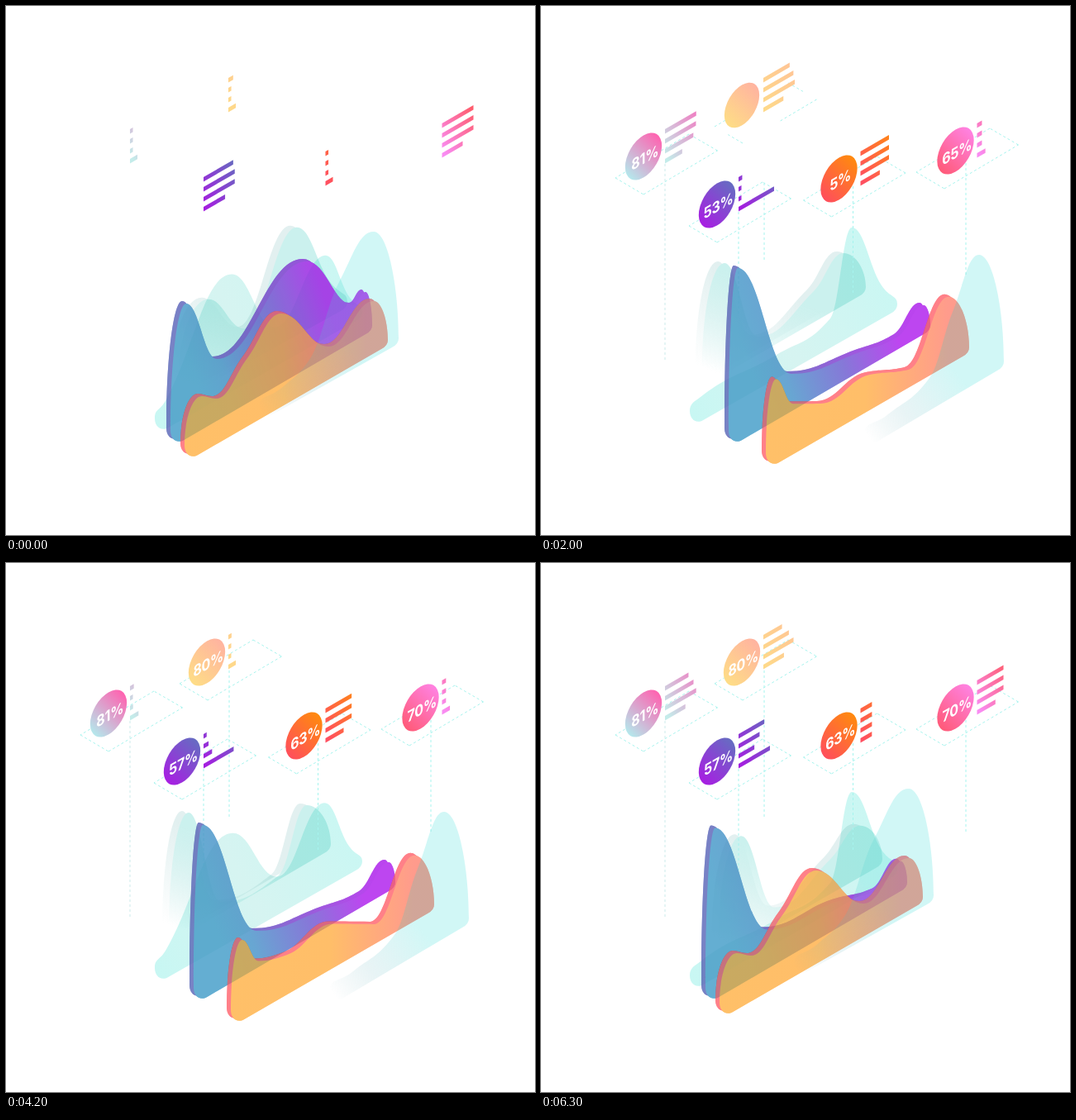
An HTML page for the animation above (6.4 s loop, 640 px wide and 640 px high).

```html
<!DOCTYPE html>
<html lang="en">
<head>
<meta charset="utf-8">
<title>Isometric charts</title>
<style>
  html, body { margin: 0; width: 100%; height: 100%; overflow: hidden; background: #fff; }
  svg { display: block; width: 100vw; height: 100vh; }
  text { font: 700 18.5px Inter, "Open Sans", sans-serif; letter-spacing: -.3px; fill: #fff; text-anchor: middle; }
  .dash { fill: none; stroke: #a6f4ee; stroke-dasharray: 3 3; }
</style>
</head>
<body>
<svg id="stage" viewBox="0 0 640 640"></svg>
<script>
const LOOP = 6400, STEP = 100;
const stage = document.getElementById('stage');

function set(node, attrs) {
  for (const k in attrs) node.setAttribute(k, attrs[k]);
}
function add(parent, tag, attrs = {}) {
  const node = document.createElementNS('http://www.w3.org/2000/svg', tag);
  set(node, attrs);
  return parent.appendChild(node);
}
const defs = add(stage, 'defs');
// A stop is [offset, colour, opacity]
function gradient([x1, y1, x2, y2], stops, gradientUnits = 'userSpaceOnUse') {
  const id = 'g' + defs.childElementCount;
  const g = add(defs, 'linearGradient', { id, x1, y1, x2, y2, gradientUnits });
  for (const [offset, color, opacity = 1] of stops)
    add(g, 'stop', { offset, 'stop-color': color, 'stop-opacity': opacity });
  return `url(#${id})`;
}

const clamp = x => Math.min(1, Math.max(0, x));
const wave = x => (1 - Math.cos(Math.PI * clamp(x))) / 2;
const mix = (a, b, k) => a + (b - a) * k;
const progress = (t, start, length) => clamp((t - start) / length);
// Sum of soft bumps, each [centre, half width, height]
const pulse = (t, bumps) => bumps.reduce(
  (sum, [at, half, height = 1]) => sum + height * wave(1 - Math.abs(t - at) / half), 0);

// Each chart blends from pose a to pose b; a pose runs wall, peaks and valleys, wall
const charts = {
  back: {
    shift: [20, 18], bumps: [[0, 900], [900, 1000, -.35], [3000, 1000], [4200, 1000, -.35], [6900, 700]],
    a: [[195, 440], [222, 311], [262, 400], [330, 345], [366, 299], [393, 340]],
    b: [[188, 440], [225, 337], [268, 372], [332, 249], [372, 316], [393, 340]],
    fill: gradient([205, 440, 250, 330], [[0, '#cbf1ee', 0], [1, '#cbf1ee']]),
    rim: gradient([205, 440, 250, 330], [[0, '#e2f0f0', 0], [1, '#e2f0f0']]),
    rimShift: [-8, -2]
  },
  mint: {
    shift: [0, 9], bumps: [[350, 1600], [4500, 1000]],
    a: [[180, 490], [193, 473], [285, 422], [350, 378], [376, 268], [412, 338], [431, 361]],
    b: [[180, 490], [193, 468], [272, 302], [322, 380], [388, 296], [416, 344], [431, 361]],
    fill: gradient([180, 490, 430, 350], [[0, '#c8f7f3'], [.5, '#d6f4f1'], [1, '#caf7f3']])
  },
  blue: {
    shift: [-28, 0], bumps: [[0, 1400], [3300, 860], [7000, 860]],
    a: [[227, 514], [238, 317], [303, 445], [385, 419], [432, 400], [463, 362], [471, 386]],
    b: [[227, 514], [246, 360], [283, 427], [392, 309], [448, 362], [463, 346], [471, 386]],
    fill: gradient([250, 430, 420, 370], [[0, '#64aed2'], [.2, '#68a6d2'], [.6, '#8678d8'], [1, '#bd46f0']]),
    rim: gradient([222, 0, 450, 0], [[0, '#7784c4'], [.4, '#8070cc'], [1, '#ba44ee']]),
    solid: .65
  },
  amber: {
    shift: [-56, -9], bumps: [[3000, 2800]],
    a: [[272, 541], [293, 481], [310, 484], [348, 435], [389, 381], [446, 421], [501, 366], [518, 413]],
    b: [[272, 541], [281, 440], [303, 480], [335, 499], [400, 472], [445, 447], [490, 346], [518, 413]],
    fill: gradient([267, 0, 518, 0], [[0, '#ffc068'], [.5, '#ffbe69'], [.9, '#ff9b8c']]),
    rim: '#ff8088', solid: .65
  },
  aqua: {
    shift: [-85, -28], bumps: [[350, 1500], [5900, 1800]],
    a: [[392, 515], [420, 494], [470, 450], [498, 370], [530, 301], [560, 430]],
    b: [[392, 510], [420, 488], [450, 456], [486, 362], [530, 301], [560, 430]],
    fill: gradient([395, 520, 500, 440], [[0, '#e0ecee', 0], [.4, '#e0f0f2', .7], [1, '#d1f7f6']]),
    solid: .16
  }
};

function addChart(chart) {
  chart.layers = [];
  const layer = style => {
    const g = add(stage, 'g', { style });
    const [x, y] = chart.rimShift || [-5, -3];
    const rim = chart.rim && add(g, 'path', { fill: chart.rim, transform: `translate(${x} ${y})` });
    const face = add(g, 'path', { fill: chart.fill });
    chart.layers.push({ g, paths: rim ? [rim, face] : [face] });
  };
  layer('mix-blend-mode:multiply');
  if (chart.solid) layer(`opacity:${chart.solid}`);
}

// Level at every peak and valley, upright at both walls, sloping base with round corners
function outline(points) {
  const last = points.length - 1;
  const steep = i => (points[i + 1][1] - points[i][1]) / (points[i + 1][0] - points[i][0]);
  const tangent = i => {
    const l = steep(i - 1), r = steep(i);
    return l * r <= 0 ? 0 : 2 * l * r / (l + r);
  };
  let d = `M${points[0]}`;
  for (let i = 0; i < last; i++) {
    const [x0, y0] = points[i], [x1, y1] = points[i + 1];
    const atWall = i === 0 || i + 1 === last;
    const reach = (atWall ? .55 : .42) * (x1 - x0);
    const from = i === 0 ? [x0, mix(y0, y1, .55)] : [x0 + reach, y0 + reach * tangent(i)];
    const to = i + 1 === last ? [x1, mix(y0, y1, .5)] : [x1 - reach, y1 - reach * tangent(i + 1)];
    d += `C${from} ${to} ${x1},${y1}`;
  }
  const [xl, yl] = points[0], [xr, yr] = points[last];
  return d + `Q${xr},${yr + 7} ${xr - 8},${yr + 11}L${xl + 18},${yl + 10}C${xl + 8},${yl + 17} ${xl},${yl + 10} ${xl},${yl}Z`;
}

function drawChart({ a, b, bumps, shift, layers }, t, apart) {
  const k = pulse(t, bumps);
  const d = outline(a.map((p, i) => p.map((n, j) => mix(n, b[i][j], k))));
  for (const { g, paths } of layers) {
    set(g, { transform: `translate(${shift.map(n => n * apart)})` });
    paths.forEach(p => set(p, { d }));
  }
}

// disc and count are [start, length]; lag delays each bar after the one above
const badges = [
  { at: [124, 182], colors: ['#b4e8ec', '#ff62b0'], barColors: ['#c4ecea', '#ee82c4'],
    disc: [0, 1160], pop: 0, count: [70, 1160], value: 81, post: [150, 430], postColor: '#cdeaea',
    bumps: [[1900, 1900], [5700, 1700]], lag: 250 },
  { at: [213, 240], colors: ['#a81ee2', '#666cc2'], barColors: ['#a41fdf', '#6868c0'],
    disc: [450, 1160], pop: 1000, count: [920, 1160], value: 57, post: [239, 375],
    bumps: [[300, 1900], [5800, 1700]], lag: -200, tail: 43 },
  { at: [243, 120], colors: ['#fedd86', '#ffb3a0'], barColors: ['#fed98a', '#ffc396'],
    disc: [820, 1500], pop: 2050, count: [2100, 1060], value: 80, post: [270, 307], late: true,
    bumps: [[1500, 1800], [5600, 1500]], lag: 250 },
  { at: [360.5, 209], colors: ['#ff4e5c', '#ff8a0e'], barColors: ['#ff5060', '#ff8418'],
    disc: [380, 1160], pop: 1700, count: [1912, 1088], value: 63, post: [377.5, 350],
    bumps: [[1650, 1700], [4850, 2300]] },
  { at: [501.5, 175], colors: ['#ff5a78', '#ff82e2'], barColors: ['#f98cf2', '#ff5c6c'],
    disc: [0, 1160], pop: 770, count: [770, 1320], value: 70, post: [514, 325],
    bumps: [[0, 2400], [3150, 1200], [6600, 1100]] }
];
// Panel corners around the post
const PANEL = [[-26, 46], [63.5, -7], [29, -27], [-60, 26]];
const ROWS = [0, 1, 2, 3];

function addGuides(b) {
  const g = add(stage, 'g', { transform: `translate(${b.post[0]} ${b.at[1]})` });
  b.panel = add(g, 'path', { class: 'dash' });
  b.line = add(g, 'path', { class: 'dash', style: b.postColor ? `stroke:${b.postColor}` : '' });
}

function addBadge(b) {
  const g = add(stage, 'g', { transform: `matrix(.866 -.5 0 1 ${b.at})` });
  const ends = ([from, to]) => [[0, from], [1, to]];
  b.circle = add(g, 'circle', { fill: gradient([.1, .8, .9, .2], ends(b.colors), 'objectBoundingBox') });
  const fill = gradient([30, 14, 74, -12], ends(b.barColors));
  b.rects = ROWS.map(row => add(g, 'rect', { x: 30, y: 12 * row - 18, height: 5.5, fill }));
  b.label = add(g, 'text', { y: 6.5 });
}

function drawBadge(b, t) {
  const grow = progress(t, ...b.disc);
  set(b.circle, { r: 25.6 * (1 - (1 - grow) ** 2) });

  const { lag = 0, tail = 9 } = b;
  b.rects.forEach((r, row) => {
    const [short, long] = row < 3 ? [3.5, 38] : [tail, 25];
    set(r, { width: mix(short, long, clamp(pulse(t - lag * row, b.bumps))) / .866 });
  });

  const size = progress(t, b.pop, 220);
  set(b.label, { transform: `translate(2 2.5) scale(${size})`, visibility: size ? 'visible' : 'hidden' });
  b.label.textContent = Math.round(b.value * progress(t, ...b.count)) + '%';

  const drawn = progress(t, b.late ? 1300 : 0, 1350);
  const corners = b.late ? [...PANEL].reverse() : PANEL;
  set(b.panel, {
    d: corners.map((p, i) => {
      const q = corners[(i + 1) % 4];
      return `M${p}L${p.map((n, j) => mix(n, q[j], drawn))}`;
    }).join('')
  });
  const span = [9, b.post[1] - b.at[1]];
  if (b.late) span.reverse();
  set(b.line, { d: `M0,${span[0]}V${mix(...span, drawn)}` });
}

addChart(charts.back);
addChart(charts.mint);
badges.forEach(addGuides);
addChart(charts.blue);
addChart(charts.amber);
addChart(charts.aqua);
badges.forEach(addBadge);

function frame(now) {
  const t = Math.floor((now % LOOP) / STEP) * STEP;
  const apart = 1 - wave(t / 1100) + wave((t - 5000) / 1200);
  for (const name in charts) drawChart(charts[name], t, apart);
  badges.forEach(b => drawBadge(b, t));
}
const start = performance.now();
function tick() {
  frame(performance.now() - start);
  requestAnimationFrame(tick);
}
tick();
</script>
</body>
</html>
```
